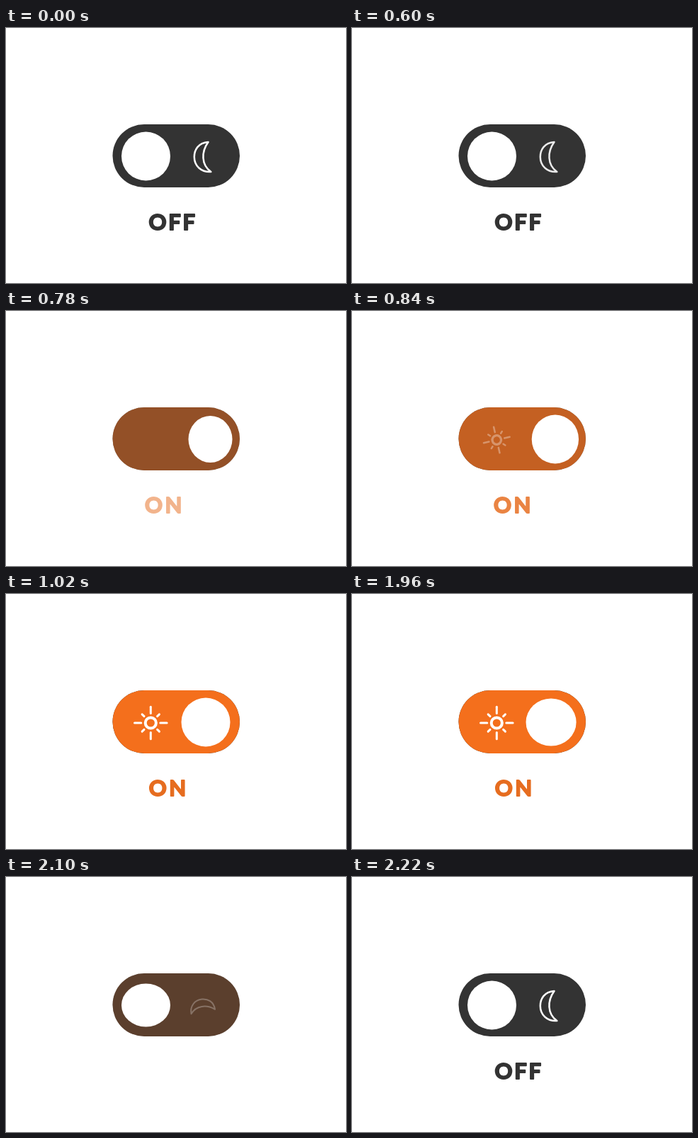
An HTML page for the animation above (3000 ms loop, 480x360 px).

```html
<!DOCTYPE html>
<html lang="en">
<head>
<meta charset="utf-8">
<title>Toggle switch</title>
<style>
  html, body { margin: 0; width: 100%; height: 100%; overflow: hidden; background: #fff; }
  svg { display: block; width: 480px; height: 360px; }
  .icon { fill: none; stroke: #fff; stroke-linecap: round; stroke-linejoin: round; }
  text { font: 700 31px Lato, sans-serif; stroke-width: 1.9; stroke-linejoin: round; }
  #off { fill: #333; stroke: #333; }
  #on { fill: #e66d20; stroke: #e66d20; }
</style>
</head>
<body>
<svg viewBox="0 0 480 360">
  <rect x="150.5" y="136" width="179.5" height="89" rx="44.5" fill="#333"/>
  <rect id="lit" x="150.5" y="136" width="179.5" height="89" rx="44.5" fill="#f46f1c"/>
  <g id="moon" class="icon" stroke-width="2.5">
    <path d="M285.5 161C271.5 162 265.8 172 265.8 182C265.8 195 276 204 289.3 203C275.5 193 275.5 175 285.5 161Z"/>
  </g>
  <g id="sun" class="icon" stroke-width="3">
    <circle cx="204.3" cy="182" r="7.6" stroke-width="4"/>
  </g>
  <ellipse id="knob" cy="181" fill="#fff"/>
  <text id="off" x="201.6 229.2 249.4" y="285.3">OFF</text>
  <text id="on" x="201.8 230.3" y="285.3">ON</text>
</svg>
<script>
const LOOP = 3000, STEP = 20;
const LEFT = 197.5, TRAVEL = 84.5, OVERSHOOT = 6.5, RADIUS = 34.5;
const $ = id => document.getElementById(id);
const [lit, moon, sun, knob, off, on] = ['lit', 'moon', 'sun', 'knob', 'off', 'on'].map($);

const ramp = (t, from, to) => Math.min(1, Math.max(0, (t - from) / (to - from)));
const easeOut = p => 1 - (1 - p) ** 2;
const sine = p => (1 - Math.cos(Math.PI * p)) / 2;
const bump = (t, from, to) => Math.sin(Math.PI * ramp(t, from, to));

// slides right past its rest, settles, then slides back; stretches while moving
function setKnob(t) {
  const cx = LEFT
    + (TRAVEL + OVERSHOOT) * sine(ramp(t, 600, 780))
    - OVERSHOOT * sine(ramp(t, 780, 960))
    - TRAVEL * sine(ramp(t, 1950, 2100));
  const rx = RADIUS + 9 * bump(t, 600, 780) - 3.5 * bump(t, 700, 860) + 5 * bump(t, 1950, 2100);
  const ry = RADIUS - 5 * bump(t, 600, 800) - 4.2 * bump(t, 1940, 2200);
  knob.setAttribute('cx', cx);
  knob.setAttribute('rx', rx);
  knob.setAttribute('ry', ry);
}

function setIcon(el, cx, cy, arrive, alpha) {
  const turn = 115 * (1 - arrive), scale = 1 - 0.26 * (1 - arrive);
  el.setAttribute('transform',
    `translate(${cx} ${cy}) rotate(${turn}) scale(${scale}) translate(${-cx} ${-cy})`);
  el.style.opacity = alpha;
}

function setLabel(el, arrive, alpha) {
  el.setAttribute('transform', `translate(${-12 * (1 - arrive)} 0)`);
  el.style.opacity = alpha;
}

function draw(t) {
  const night = t < 1500;
  lit.style.opacity = sine(ramp(t, 600, 960)) - sine(ramp(t, 1960, 2160));
  setKnob(t);

  const moonIn = night ? 1 : easeOut(ramp(t, 2080, 2220));
  setIcon(moon, 277.5, 182, moonIn, night ? 1 - ramp(t, 585, 735) : moonIn);

  const sunIn = easeOut(ramp(t, 800, 1020));
  setIcon(sun, 204.3, 182, sunIn, sunIn * (1 - ramp(t, 1960, 2080)));

  const offIn = night ? 1 : easeOut(ramp(t, 2100, 2220));
  setLabel(off, offIn, night ? 1 - ramp(t, 600, 700) : offIn);

  const onIn = easeOut(ramp(t, 720, 920));
  setLabel(on, onIn, onIn * (1 - ramp(t, 1960, 2080)));
}

// four short rays on the diagonals, four long ones on the axes
for (let i = 0; i < 8; i++) {
  const ray = document.createElementNS('http://www.w3.org/2000/svg', 'path');
  ray.setAttribute('d', i % 2 ? 'M13.2 0H17.2' : 'M13.5 0H22.8');
  ray.setAttribute('transform', `translate(204.3 182) rotate(${i * 45})`);
  sun.append(ray);
}

const start = performance.now();
function tick() {
  const t = (performance.now() - start) % LOOP;
  draw(Math.floor(t / STEP) * STEP);
  requestAnimationFrame(tick);
}
tick();
</script>
</body>
</html>
```
